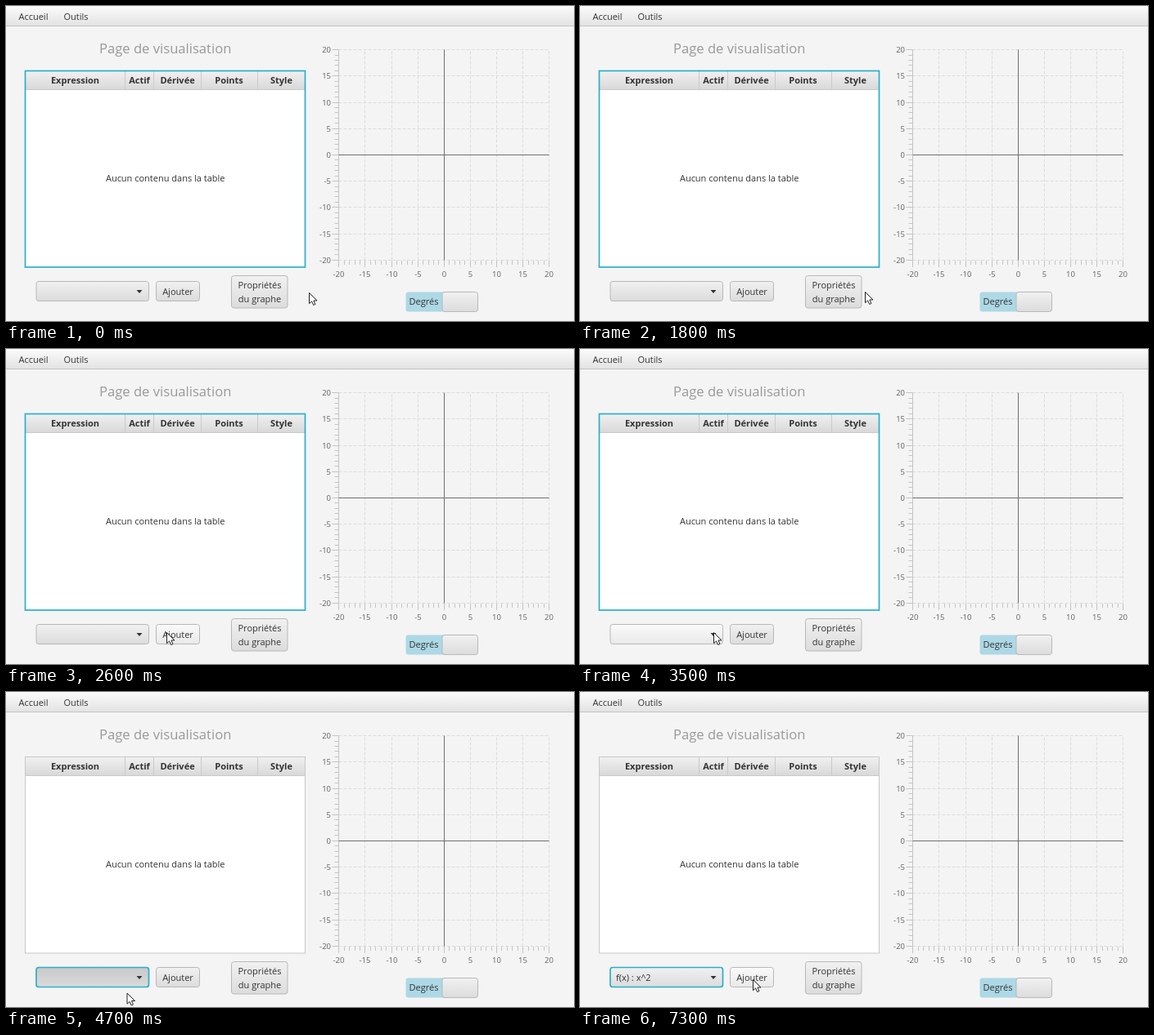
Animation of 694 by 386 pixels, one loop 8000 ms. Source, as an HTML page:

```html
<!DOCTYPE html>
<html lang="fr">
<head>
<meta charset="utf-8">
<title>Page de visualisation</title>
<style>
  html, body { margin: 0; width: 100%; height: 100%; overflow: hidden; background: #f4f4f4; }
  svg { display: block; font: 11px "Open Sans", sans-serif; }
  text { fill: #333; }
  .mid { text-anchor: middle; }
  .head { font-weight: bold; }
  .title { font-size: 16.6px; fill: #999; }
  .axis text { font-size: 9.5px; fill: #606060; }
  .grid { stroke: #dcdcdc; stroke-dasharray: 4 2; }
  .tick { stroke: #c4c4c4; }
  .zero { stroke: #707070; }
</style>
</head>
<body>
<svg id="stage" width="694" height="386" viewBox="0 0 694 386">
  <defs id="defs"></defs>
  <rect width="694" height="386" fill="#f4f4f4"/>
  <rect width="694" height="24" fill="url(#menu)"/>
  <path d="M0 24.5H694" stroke="#c4c4c4"/>
  <text x="15.5" y="16.5">Accueil</text>
  <text x="70.5" y="16.5">Outils</text>
  <text class="title" x="114" y="58">Page de visualisation</text>

  <rect x="23.5" y="79.5" width="342" height="240.5" fill="#fff"/>
  <rect x="24" y="80" width="341" height="22" fill="url(#header)"/>
  <path d="M24 102.5H365M145.5 80V102M180.5 80V102M238.5 80V102M307.5 80V102" stroke="#cacaca"/>
  <g id="heads" class="head mid"></g>
  <text class="mid" x="194.7" y="214.5">Aucun contenu dans la table</text>
  <rect id="table" x="23.5" y="79.5" width="342" height="240.5" fill="none"/>

  <g id="axis" class="axis"></g>

  <rect id="combo" x="37" y="337.5" width="137.5" height="24" rx="3"/>
  <path d="M159.5 348H166.5L163 352Z" fill="#333"/>
  <text id="choice" x="44" y="353.5">f(x) : x^2</text>
  <rect id="add" x="183.5" y="337.5" width="53" height="24" rx="3" stroke="#b8b8b8"/>
  <text class="mid" x="210" y="353.5">Ajouter</text>
  <rect id="props" x="275.5" y="330.5" width="68.5" height="39.5" rx="3" stroke="#b8b8b8"/>
  <g class="mid"><text x="310" y="346">Propriétés</text><text x="310" y="362.5">du graphe</text></g>

  <rect x="488.5" y="350.5" width="88" height="24" rx="3" fill="#add8e6"/>
  <text class="mid" x="510.5" y="366">Degrés</text>
  <rect x="533" y="350.5" width="43.5" height="24" rx="3" fill="url(#normal)" stroke="#b8b8b8"/>

  <path id="cursor" d="M0 0V13.2L3.1 10.4L5.2 15L7.4 14L5.4 9.5H9.5Z" fill="#fff" stroke="#222"/>
</svg>
<script>
const $ = id => document.getElementById(id);

// Vertical gradients for the controls
const gradient = (id, top, bottom) =>
  `<linearGradient id="${id}" x2="0" y2="1"><stop stop-color="${top}"/><stop offset="1" stop-color="${bottom}"/></linearGradient>`;
$('defs').innerHTML =
  gradient('menu', '#fbfbfb', '#e3e3e3') + gradient('header', '#f0f0f0', '#d9d9d9') +
  gradient('normal', '#f1f1f1', '#dcdcdc') + gradient('hover', '#fafafa', '#e9e9e9') +
  gradient('pressed', '#c9c9c9', '#dadada');

const heads = [['Expression', 84.5], ['Actif', 163], ['Dérivée', 209.5], ['Points', 272.5], ['Style', 336.5]];
$('heads').innerHTML = heads.map(([name, x]) => `<text x="${x}" y="95">${name}</text>`).join('');

// Axes run from -20 to 20 in both directions
function drawAxes() {
  const px = v => Math.floor(535.3 + v * 6.42) + .5;
  const py = v => Math.floor(182.4 - v * 6.44) + .5;
  const left = px(-20), right = px(20), top = py(20), bottom = py(-20);
  let grid = '', ticks = `M${left} ${top}V${bottom}`, labels = '';
  for (let v = -20; v <= 20; v++) {
    const major = v % 5 === 0, size = major ? 8 : 5, x = px(v), y = py(v);
    ticks += `M${left - size} ${y}H${left}M${x} ${bottom + .5}v${size}`;
    if (!major) continue;
    if (v) grid += `M${left} ${y}H${right}M${x} ${bottom}V${top}`;
    labels += `<text x="397" y="${y + 3.5}" text-anchor="end">${v}</text><text class="mid" x="${x}" y="332">${v}</text>`;
  }
  $('axis').innerHTML = `<path class="grid" d="${grid}"/><path class="tick" d="${ticks}" fill="none"/>` +
    `<path class="zero" d="M${left} ${py(0)}H${right}M${px(0)} ${top}V${bottom}"/>${labels}`;
}

// Pointer path: time, x, y
const path = [
  [0, 370, 351], [1700, 370, 351], [2200, 260, 346], [2600, 196, 347], [3000, 163, 347],
  [4500, 163, 347], [4900, 132, 390], [6700, 160, 392], [7100, 211, 352], [8000, 211, 352]
];

function pointer(t) {
  const i = path.findIndex(p => p[0] > t), [t0, x0, y0] = path[i - 1], [t1, x1, y1] = path[i];
  const k = (t - t0) / (t1 - t0);
  return [x0 + (x1 - x0) * k, y0 + (y1 - y0) * k];
}

function over(id, x, y) {
  const box = $(id).getBBox();
  return x >= box.x && x <= box.x + box.width && y >= box.y && y <= box.y + box.height;
}

function outline(id, focused, grey) {
  $(id).setAttribute('stroke', focused ? '#2aafcc' : grey);
  $(id).setAttribute('stroke-width', focused ? 1.7 : 1);
}

function render(now) {
  const t = Math.floor(now % 8000 / 100) * 100;
  const [x, y] = pointer(t);
  const focused = t >= 3600, chosen = t >= 6200;
  for (const id of ['combo', 'add', 'props']) {
    const pressed = id === 'combo' && focused && !chosen;
    const state = pressed ? 'pressed' : over(id, x, y) ? 'hover' : 'normal';
    $(id).setAttribute('fill', `url(#${state})`);
  }
  outline('table', !focused, '#c8c8c8');
  outline('combo', focused, '#b8b8b8');
  $('choice').setAttribute('visibility', chosen ? 'visible' : 'hidden');
  $('cursor').setAttribute('transform', `translate(${x + .5} ${y + .5})`);
}

drawAxes();
const start = performance.now();
function tick() {
  render(performance.now() - start);
  requestAnimationFrame(tick);
}
tick();
</script>
</body>
</html>
```
